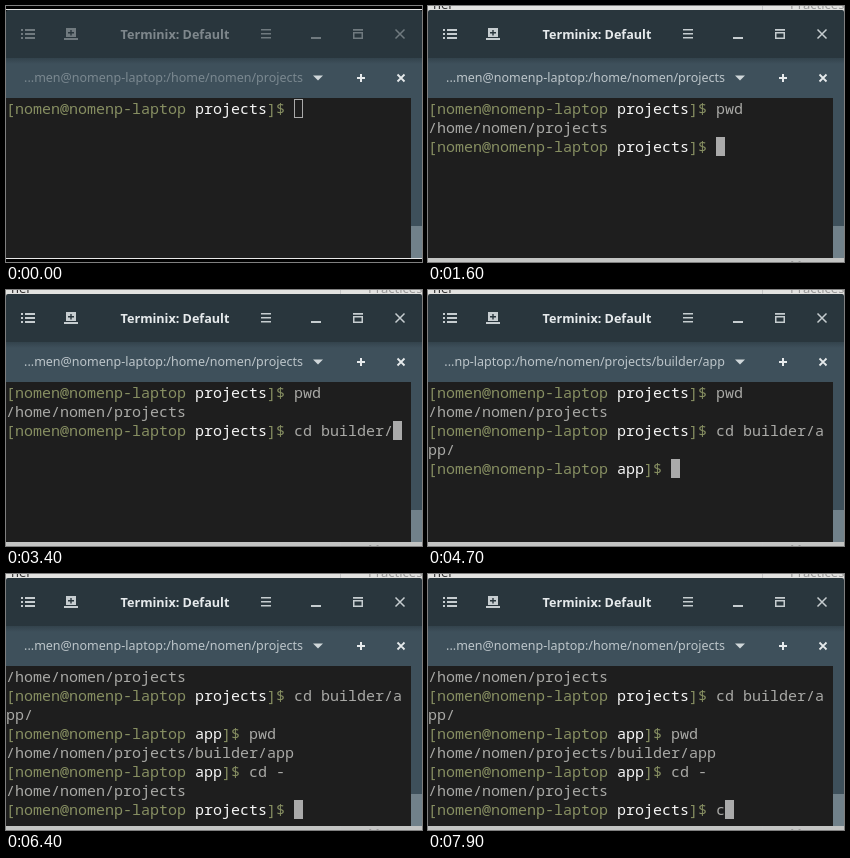
An HTML page that plays this animation: 416x256 px, repeating every 8000 ms.

```html
<!DOCTYPE html>
<html lang="en">
<head>
<meta charset="utf-8">
<title>Terminal session</title>
<style>
  html, body { margin: 0; width: 100%; height: 100%; overflow: hidden; background: #000; }
  svg, pre, #cursor { position: absolute; left: 0; top: 0; }
  svg { width: 416px; height: 256px; font-family: "Noto Sans", "Open Sans", sans-serif; }
  pre {
    top: 93px; width: 405px; height: 152px; margin: 0; overflow: hidden;
    font: 15px/19px "Noto Sans Mono", "DejaVu Sans Mono", monospace; color: #a9a9a6;
  }
  pre i { font-style: normal; color: #878f62; }
  pre b { font-weight: normal; color: #f6f6f6; }
  #cursor { width: 9px; height: 19px; box-sizing: border-box; border: 1px solid #aaa; }
</style>
</head>
<body>
<svg viewBox="0 0 416 256">
  <linearGradient id="shade" x2="0" y2="1">
    <stop stop-color="#33434c"/>
    <stop offset=".15" stop-color="#3e505b"/>
  </linearGradient>
  <g id="desktop">
    <path fill="#e2e2e0" d="M0 0H416V8H0Z"/>
    <path fill="#c3c4c3" d="M0 250H416V256H0Z"/>
    <path stroke="#c4c5c5" d="M334.5 0V6M334.5 250V256"/>
    <g font-size="13" fill="#999">
      <text x="5" y="3" fill="#333">ner</text>
      <text x="362" y="3">Practices</text>
      <text x="362" y="264">Mo</text>
    </g>
  </g>
  <path id="frame" stroke="#e8e8e8" d="M0 3.5H416M0 252.5H416"/>
  <path fill="#29363d" d="M0 52V6Q0 4 2 4H414Q416 4 416 6V52Z"/>
  <path fill="url(#shade)" d="M0 52H416V92H0Z"/>
  <path fill="#3e505b" d="M405 92H416V252H405Z"/>
  <path fill="#1e1e1e" d="M0 92H405V252H0Z"/>
  <path fill="#71818a" d="M405 220H416V252H405Z"/>

  <g id="header" fill="#c6cdd0" stroke="#c6cdd0" stroke-width="0">
    <text x="169" y="32.5" text-anchor="middle" font-size="12.6" font-weight="700" fill="#e6eaec">Terminix: Default</text>
    <path d="M15 23h2v2h-2zM19 23h10v2h-10zM15 27h2v2h-2zM19 27h10v2h-10zM15 31h2v2h-2zM19 31h10v2h-10z"/>
    <path fill-rule="evenodd" d="M60 22H70V31H60ZM64.3 24V26H62V27.4H64.3V29.5H65.7V27.4H68V26H65.7V24ZM58 32H72V34H58Z"/>
    <path d="M255 23h10v1.6h-10zM255 27h10v1.6h-10zM255 31h10v1.6h-10zM305 31h10v2h-10z"/>
    <path fill-rule="evenodd" d="M347 23H357V24.7H347ZM347 26H357V33H347ZM348.5 27.5V31.5H355.5V27.5Z"/>
    <path stroke-width="1.5" d="M389.5 23.5L398.5 32.5M398.5 23.5L389.5 32.5"/>
  </g>

  <text id="tab" x="297" y="76.3" text-anchor="end" font-size="12.5" fill="#e0e6e9"></text>
  <path fill="#d0d7da" d="M307 69.5H317L312 74.5Z"/>
  <path stroke="#e6eaec" stroke-width="2" d="M351 72H359M355 68V76"/>
  <path stroke="#e6eaec" stroke-width="1.8" d="M391.5 68.5L398.5 75.5M398.5 68.5L391.5 75.5"/>
</svg>
<pre id="screen"></pre>
<div id="cursor"></div>

<script>
const LOOP = 8000, ROWS = 8, CELL_W = 9, CELL_H = 19, TOP = 93, FOCUS = 200;
const USER = "nomen", HOST = USER + "p-laptop";
const HOME = `/home/${USER}/projects`, APP = HOME + "/builder/app";
const prompt = dir => `[${USER}@${HOST} ${dir}]$ `;

// Time of each key press or output, and the text it adds.
const log = [
  [0, prompt("projects")],
  [1000, "p"], [1200, "w"], [1400, "d"],
  [1600, `\n${HOME}\n` + prompt("projects")],
  [1900, "c"], [2100, "d"], [2300, " "], [2700, "b"], [2900, "u"], [3100, "ilder/"],
  [3600, "a\n"], [3900, "pp/"],
  [4500, "\n" + prompt("app")],
  [4800, "p"], [5000, "w"], [5100, "d"],
  [5300, `\n${APP}\n` + prompt("app")],
  [5500, "c"], [5700, "d"], [5900, " "], [6100, "-"],
  [6300, `\n${HOME}\n` + prompt("projects")],
  [7600, "c"]
];

const $ = id => document.getElementById(id);
const [desktop, frame, header, tab, screen, cursor] =
  ["desktop", "frame", "header", "tab", "screen", "cursor"].map($);
let shown;

function draw(t) {
  const done = log.filter(([at]) => at <= t);
  const lines = done.map(e => e[1]).join("").split("\n").slice(-ROWS);
  const html = lines.join("\n").replace(/(\[\S+)( \w+)(\]\$)/g, "<i>$1</i><b>$2</b><i>$3</i>");
  if (html !== shown) screen.innerHTML = shown = html;

  // The tab shows the end of the current path.
  const inApp = t >= 4500 && t < 6300;
  tab.textContent = inApp
    ? `...${HOST.slice(4)}:${APP}`
    : `...${USER.slice(2)}@${HOST}:${HOME}`;

  // The window gains focus in three steps.
  const focus = Math.min(1, Math.floor(t / 100) / 3);
  header.setAttribute("opacity", 0.45 + 0.55 * focus);
  tab.setAttribute("opacity", 0.37 + 0.41 * focus);
  desktop.style.display = t < 100 ? "none" : "";
  frame.style.display = t < 100 ? "" : "none";

  const last = Math.max(FOCUS, done[done.length - 1][0]);
  const on = t < FOCUS || (t - last) % 1200 < 600;
  const x = lines[lines.length - 1].length * CELL_W;
  const y = TOP + (lines.length - 1) * CELL_H;
  cursor.style.transform = `translate(${x}px, ${y}px)`;
  cursor.style.background = t < FOCUS ? "none" : "#aaa";
  cursor.style.visibility = on ? "visible" : "hidden";
}

const start = performance.now();
function tick() {
  draw((performance.now() - start) % LOOP);
  requestAnimationFrame(tick);
}
tick();
</script>
</body>
</html>
```
